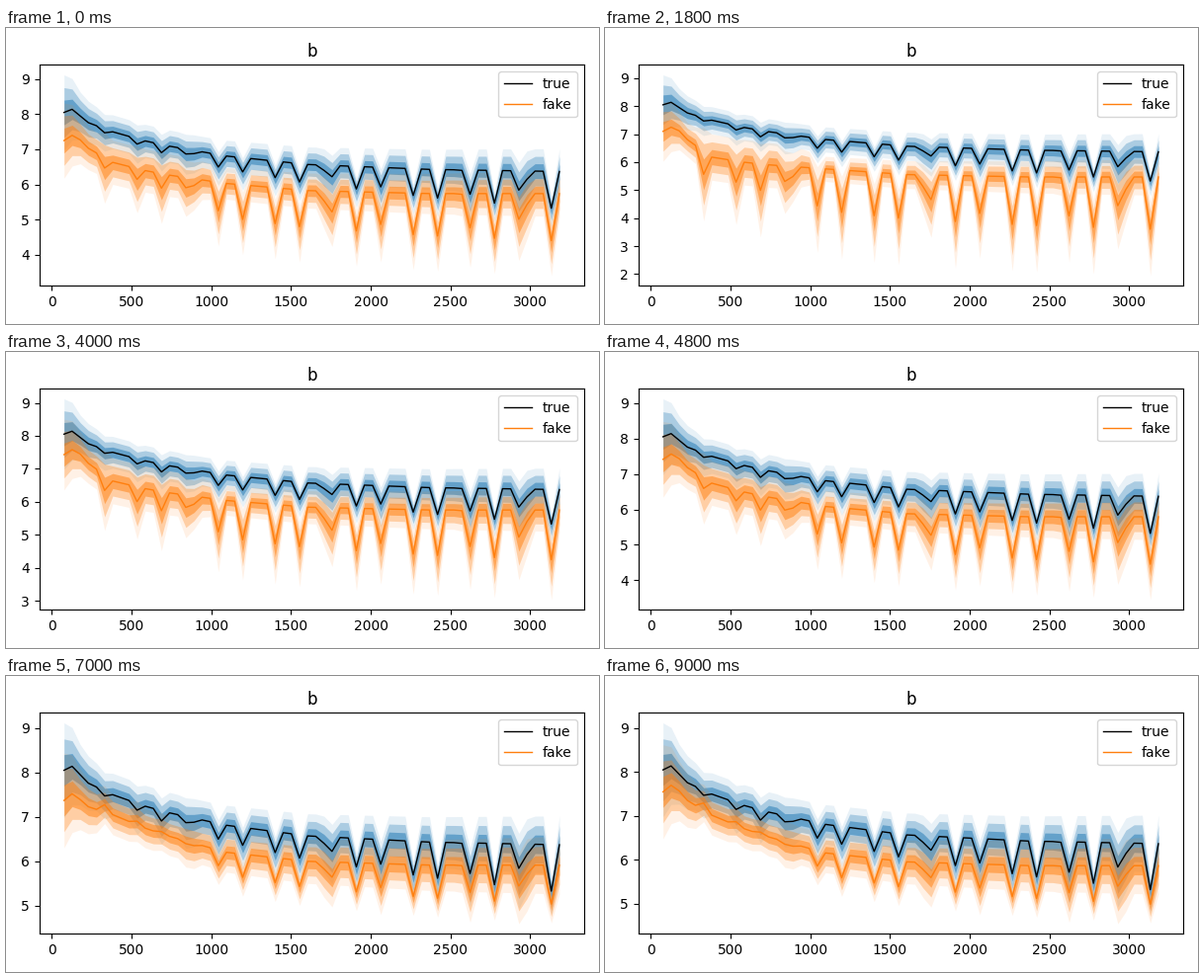
Recreate the animation shown at these times as a matplotlib script. Size 600 by 300 pixels, loop 9.2 s.

```python
import numpy as np
import matplotlib.pyplot as plt
from matplotlib.animation import FuncAnimation

FRAMES, INTERVAL = 46, 200
N, STEP = 62, 50.92
PERIOD, LAST_DIP = 3.415, 59.865
BANDS = [(1, .1), (.66, .3), (.33, .5)]

# Key poses of the fake curve: gap to the true one at the start, shortly
# after and at the end, then how much deeper its dips are.
KEYS = [0, 9, 14, 20, 35, 45]
POSES = np.array([[.80, .87, .63, .28],
                  [.95, 1.32, .90, .81],
                  [1.0, 1.28, .85, .83],
                  [.62, .87, .62, .45],
                  [.68, .45, .46, -.18],
                  [.50, .48, .50, -.18]])
SURGE = np.array([-.97, -1.03, -1.03, -.33])

idx = np.arange(N)
x = STEP * (idx + 1.5)


def along(knots, values):
    return np.interp(idx, knots, values)


# Dips recur with a period that is no whole number of samples, so some of
# them fall between two samples, where they are shallower but more spread.
to_dip = np.abs((idx - LAST_DIP + PERIOD / 2) % PERIOD - PERIOD / 2)
dip = np.clip(2 - 3.2 * to_dip, 0, 1)
dip[:4] = 0
depth = .03 + .017 * idx
true = along([0, 1, 3, 6, 10, 13, 20, 30, 45, 61],
             [8.05, 8.14, 7.76, 7.5, 7.24, 7.09, 6.81, 6.57, 6.43, 6.37])
true -= depth * dip

calm = along([0, 2, 5, 16, 61], [1.07, .68, .47, .43, .65])
mixed = 1.4 * depth * dip * (1 - dip)
unrest = np.maximum(dip, along([3, 6, 16, 20], [0, .3, .3, 0]))
upper = along([0, 12, 30], [1, 1, .6])


def pose_at(n):
    pose = np.array([np.interp(n, KEYS, col) for col in POSES.T])
    return pose + np.interp(n, [24, 28, 31], [0, 1, 0]) * (SURGE - pose)


def fake_curve(pose):
    start, mid, end, extra = pose
    gap = along([0, 2, 6, 20, 61], [start, start - .12, mid, end + .15, end])
    deeper = extra + along([12, 22, 61], [-.1, .3, 0])
    return true - gap - deeper * dip, .65 + 1.25 * extra


def draw_series(curve, spread, band_color, line_color, label):
    down = calm + (spread - calm) * unrest + mixed
    up = calm + (upper * spread - calm) * unrest + mixed
    for scale, alpha in BANDS:
        ax.fill_between(x, curve - scale * down, curve + scale * up,
                        color=band_color, alpha=alpha, lw=0)
    ax.plot(x, curve, color=line_color, lw=1, label=label)
    return (curve - down).min(), (curve + up).max()


def update(n):
    ax.clear()
    fake, spread = fake_curve(pose_at(n))
    lows, highs = zip(
        draw_series(true, .52, "tab:blue", "black", "true"),
        draw_series(fake, spread, "tab:orange", "tab:orange", "fake"))
    low, high = min(lows), max(highs)
    pad = .05 * (high - low)
    ax.set_ylim(low - pad, high + pad)
    ax.set_title("b")
    ax.legend(loc="upper right")
    fig.tight_layout()


fig, ax = plt.subplots(figsize=(6, 3), dpi=100)
anim = FuncAnimation(fig, update, frames=FRAMES, interval=INTERVAL,
                     init_func=lambda: None, repeat=True, repeat_delay=0)
plt.show()
```
